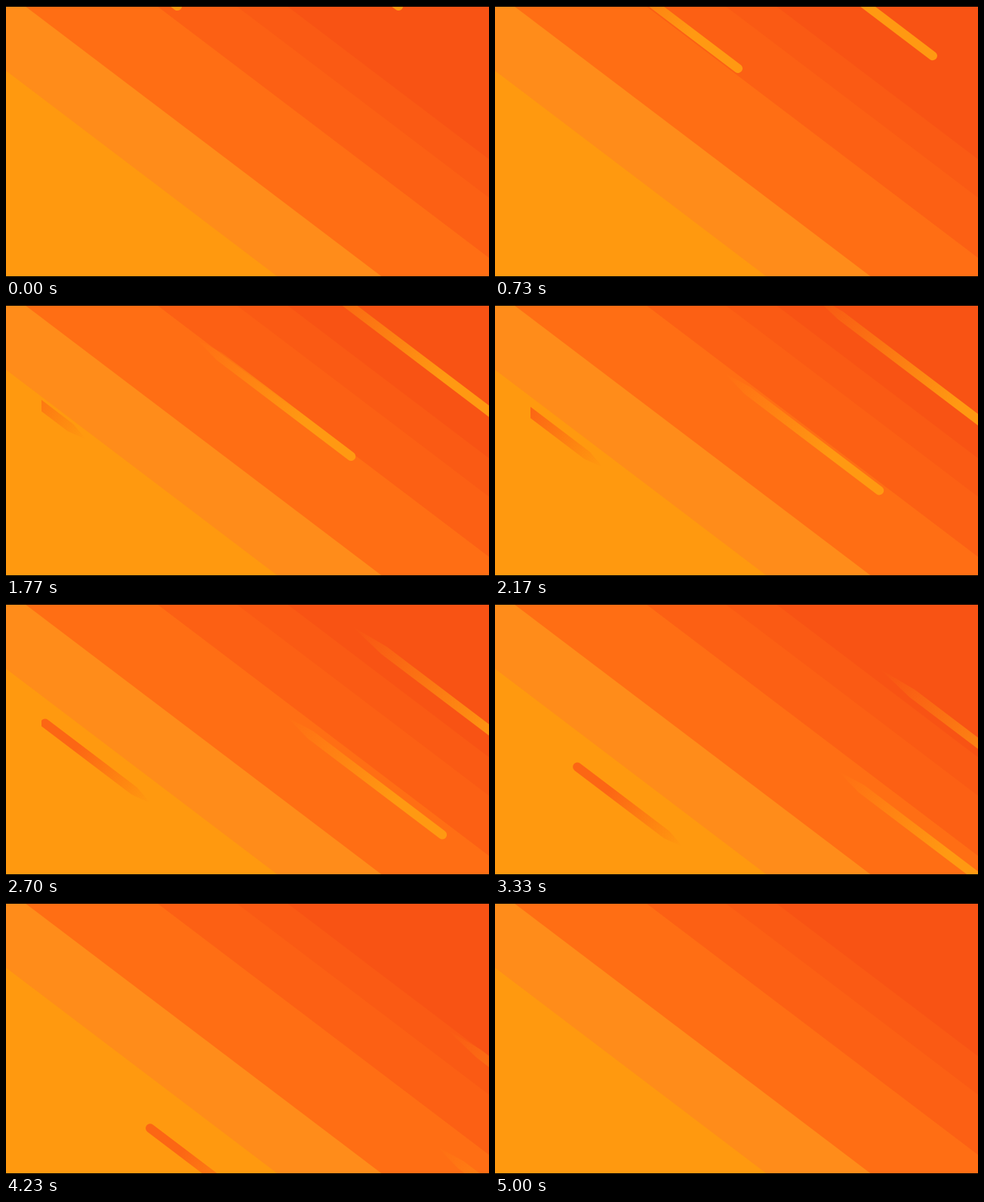
An HTML page with a canvas that plays this animation: 640 by 360 pixels, repeating every 5.03 s.

```html
<!DOCTYPE html>
<html lang="en">
<head>
<meta charset="utf-8">
<title>Diagonal streaks</title>
<style>
html, body { margin: 0; width: 100%; height: 100%; overflow: hidden; background: #000; }
canvas { display: block; }
</style>
</head>
<body>
<canvas id="stage" width="640" height="360"></canvas>
<script>
const ctx = document.getElementById('stage').getContext('2d');
const W = 640, H = 360, LOOP = 5030, SLOPE = .76;
const ANGLE = Math.atan(SLOPE);

// Each colour fills everything above the line y = top + SLOPE * x.
const bands = [
  { color: '#ff990f', top: H },
  { color: '#ff8c1a', top: 86 },
  { color: '#ff6e14', top: -19 },
  { color: '#fc6014', top: -152 },
  { color: '#fa5a14', top: -232 },
  { color: '#f85314', top: -283 }
];

// Head position at the loop start, speed in px/ms, length, turn and left clip edge.
const yellow = '255,153,18', red = '252,102,20';
const streaks = [
  { x: 227, y: 0, vx: .13, vy: .1135, len: 258, turn: Math.PI, left: 0, rgb: yellow },
  { x: 520, y: 0, vx: .082, vy: .0905, len: 355, turn: Math.PI, left: 0, rgb: yellow },
  { x: -194, y: -90, vx: .091, vy: .092, len: 175, turn: 0, left: 47, rgb: red }
];

function drawBand({ color, top }) {
  ctx.fillStyle = color;
  ctx.beginPath();
  ctx.moveTo(0, top);
  ctx.lineTo(W, top + SLOPE * W);
  ctx.lineTo(W, -H);
  ctx.lineTo(0, Math.min(top, -H));
  if (top > 0) ctx.lineTo(0, -H);
  ctx.fill();
}

function drawStreak({ x, y, vx, vy, len, turn, left, rgb }, t) {
  const r = 6, taper = len * .85;
  const fade = ctx.createLinearGradient(0, 0, len, 0);
  fade.addColorStop(.3, `rgba(${rgb},1)`);
  fade.addColorStop(1, `rgba(${rgb},0)`);

  ctx.save();
  ctx.beginPath();
  ctx.rect(left, 0, W, H);
  ctx.clip();
  ctx.translate(x + vx * t, y + vy * t);
  // The tail runs along +x after the turn.
  ctx.rotate(ANGLE + turn);
  ctx.fillStyle = fade;
  ctx.beginPath();
  ctx.arc(0, 0, r, Math.PI / 2, Math.PI * 1.5);
  ctx.lineTo(taper, -r);
  ctx.lineTo(len, 0);
  ctx.lineTo(taper, r);
  ctx.fill();
  ctx.restore();
}

function frame(now) {
  const t = now % LOOP;
  bands.forEach(drawBand);
  streaks.forEach(s => drawStreak(s, t));
  ctx.fillStyle = '#000';
  ctx.fillRect(0, 0, W, 1);
  ctx.fillRect(0, H - 1, W, 1);
  requestAnimationFrame(frame);
}
frame(0);
</script>
</body>
</html>
```
